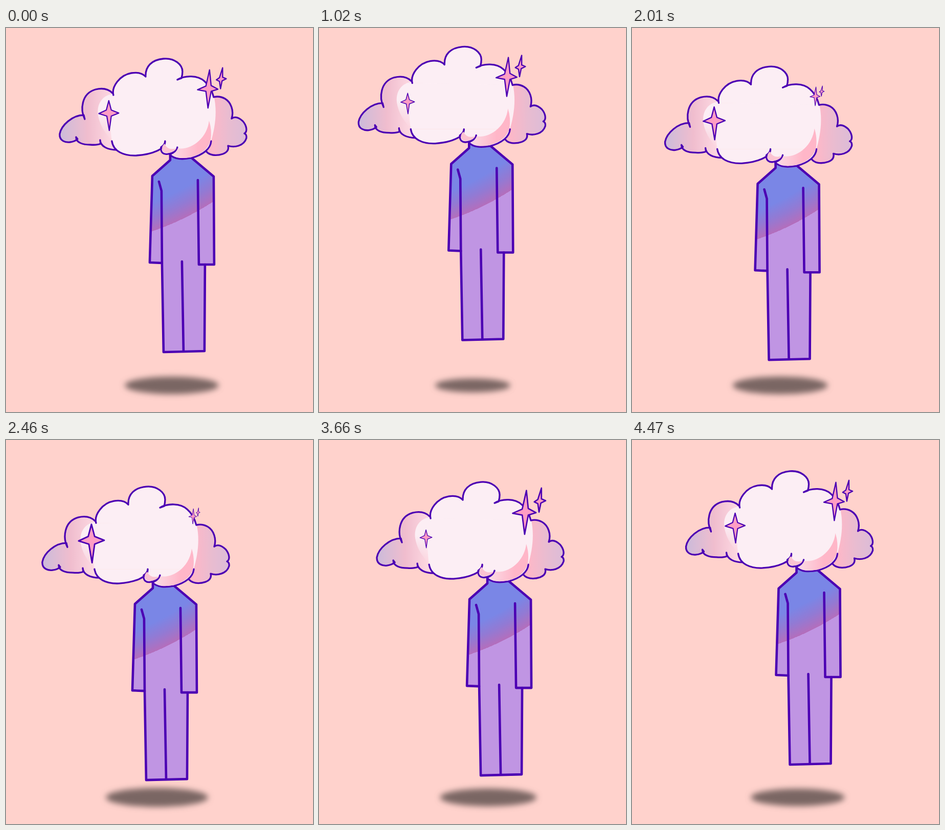
Animation, 600 px wide and 750 px high, one loop 4.5 s. Source, as an HTML page:

```html
<!DOCTYPE html>
<html lang="en">
<head>
<meta charset="utf-8">
<title>Head in the clouds</title>
<style>
  html, body { margin: 0; width: 100%; height: 100%; overflow: hidden; background: #ffd2cc; }
  svg { display: block; width: 100%; height: 100%; }
  path { stroke-linecap: round; stroke-linejoin: round; }
  .body, .cloud, .star { stroke: #4c00b3; }
  .body { stroke-width: 4.6; }
  .cloud { stroke-width: 3.3; }
  .star { stroke-width: 2.3; fill: #ff9dc4; }
  .white { fill: #fceef4; }
</style>
</head>
<body>
<svg viewBox="0 0 600 750">
  <defs>
    <filter id="soft" x="-20%" y="-100%" width="140%" height="300%"><feGaussianBlur stdDeviation="6"/></filter>
    <radialGradient id="clothes" gradientUnits="userSpaceOnUse" cx="116" cy="-104" r="529">
      <stop offset=".9" stop-color="#7a86e6"/><stop offset=".95" stop-color="#927ad4"/>
      <stop offset="1" stop-color="#b46ebc"/><stop offset="1" stop-color="#c095e3"/>
    </radialGradient>
    <linearGradient id="puffs" gradientUnits="userSpaceOnUse" x1="105" y1="0" x2="472" y2="0">
      <stop stop-color="#cbbbda"/><stop offset=".15" stop-color="#f0bdce"/>
      <stop offset=".28" stop-color="#fdd9e2"/><stop offset=".8" stop-color="#ffb7c7"/>
      <stop offset=".9" stop-color="#e9bcd0"/><stop offset="1" stop-color="#dbbcd8"/>
    </linearGradient>
    <linearGradient id="glow" x2="0" y2="1">
      <stop offset=".4" stop-color="#fceef4"/><stop offset="1" stop-color="#fceef4" stop-opacity="0"/>
    </linearGradient>
    <linearGradient id="blush" gradientUnits="userSpaceOnUse" x1="318" y1="0" x2="375" y2="0">
      <stop stop-color="#fbdfe8"/><stop offset="1" stop-color="#ffb6c8"/>
    </linearGradient>
  </defs>

  <ellipse id="shadow" cy="698" fill="#7a6663" filter="url(#soft)"/>

  <g id="figure">
    <path class="body" fill="url(#clothes)" d="M321 246V258L286 289 281 458 305 459 308 633 388 631 389 462 407 462 406 290 362 253"/>
    <path class="body" fill="none" d="M299 300 304 318 305 459M389 462H377L375 297M344 456 347 630"/>

    <path class="cloud" fill="url(#puffs)" d="M208 127Q196 115 175 120C147 128 145 160 154 178L152 170C130 170 108 190 105 207C104 221 117 224 125 223Q134 222 140 217L137 213C137 224 150 228 165 228Q178 229 185 226L184 219C185 232 200 238 216 238"/>
    <path class="cloud" fill="url(#puffs)" d="M390 238C395 250 412 250 424 246Q437 241 434 230C446 234 465 231 470 215Q471 208 466 206C473 202 470 190 463 182Q450 170 441 177C446 162 440 145 428 138Q417 132 406 135"/>
    <path fill="url(#glow)" d="M208 129C187 132 177 150 180 170C183 187 190 200 205 218H216V129Z"/>
    <path class="white" d="M210 131H406C414 165 408 195 401 221H207C203 196 203 150 210 131"/>
    <path class="cloud white" d="M210 131C206 115 222 92 245 88Q264 85 273 95C272 75 285 62 308 60C330 58 345 72 345 85Q345 92 343 98L335 101C350 92 375 92 388 104Q401 115 406 135"/>
    <path class="cloud white" d="M207 221C210 241 230 250 255 249C285 247 312 237 311 221Q311 228 303 233C302 243 308 248 317 246Q333 243 335 233Q333 243 320 247C330 257 345 257 362 254C385 248 400 236 401 221"/>
    <path fill="url(#blush)" d="M397 181Q403 200 400 219C396 235 383 246 362 252C345 255 334 255 324 247Q333 243 336 235C362 239 393 216 397 181"/>
    <path fill="#fbc3d2" d="M310 226Q305 230 305 236Q306 245 317 244Q331 241 333 235Q316 240 310 226"/>

    <path class="star" id="leftStar" d="M0-30 5-11 20-5 5 1 1 30-4 1-20-4-5-11Z"/>
    <path class="star" id="rightStars" d="M-4-35-1-5 12 2-1 6-7 38-11 6-27 3-11-4ZM21-39 21-21 28-18 20-14 17 1 15-13 9-16 15-20Z"/>
  </g>
</svg>
<script>
const LOOP = 4500, STEP = 30, SHADOW_END = 3750;
const [figure, shadow, leftStar, rightStars] =
  ['figure', 'shadow', 'leftStar', 'rightStars'].map(id => document.getElementById(id));

// Looping curve: a mean plus [cosine, sine] harmonics of the loop.
const wave = (mean, ...harmonics) => time => harmonics.reduce((sum, [c, s], i) => {
  const angle = (i + 1) * time / LOOP * 2 * Math.PI;
  return sum + c * Math.cos(angle) + s * Math.sin(angle);
}, mean);

const driftX = wave(-16.9, [19.7, -15.2], [-2.2, -1.2], [-.7, .8]);
const driftY = wave(8.3, [-13.7, -25.4], [4, .5], [1.4, .4]);
const leftSize = wave(.88, [-.16, -.03], [.2, .08], [.05, -.04]);
const rightSize = wave(.87, [.33, 0], [-.15, -.05], [-.03, .02]);
const shadowSize = wave(90.3, [-4.7, -11.5], [4, 0], [2.2, 0]);

const place = (node, x, y, size = 1) =>
  node.setAttribute('transform', `translate(${x} ${y}) scale(${size})`);

function draw(now) {
  const t = Math.floor(now % LOOP / STEP) * STEP;
  place(figure, driftX(t), driftY(t));
  place(leftStar, 201, 171, leftSize(t));
  place(rightStars, 402, 117.5, rightSize(t));

  // The shadow returns to its first pose early and waits there.
  const s = t < SHADOW_END ? t : 0, r = shadowSize(s);
  shadow.setAttribute('cx', 324 + .85 * driftX(s));
  shadow.setAttribute('rx', r);
  shadow.setAttribute('ry', r * .185);
}

const start = performance.now();
function tick() {
  draw(performance.now() - start);
  requestAnimationFrame(tick);
}
tick();
</script>
</body>
</html>
```
